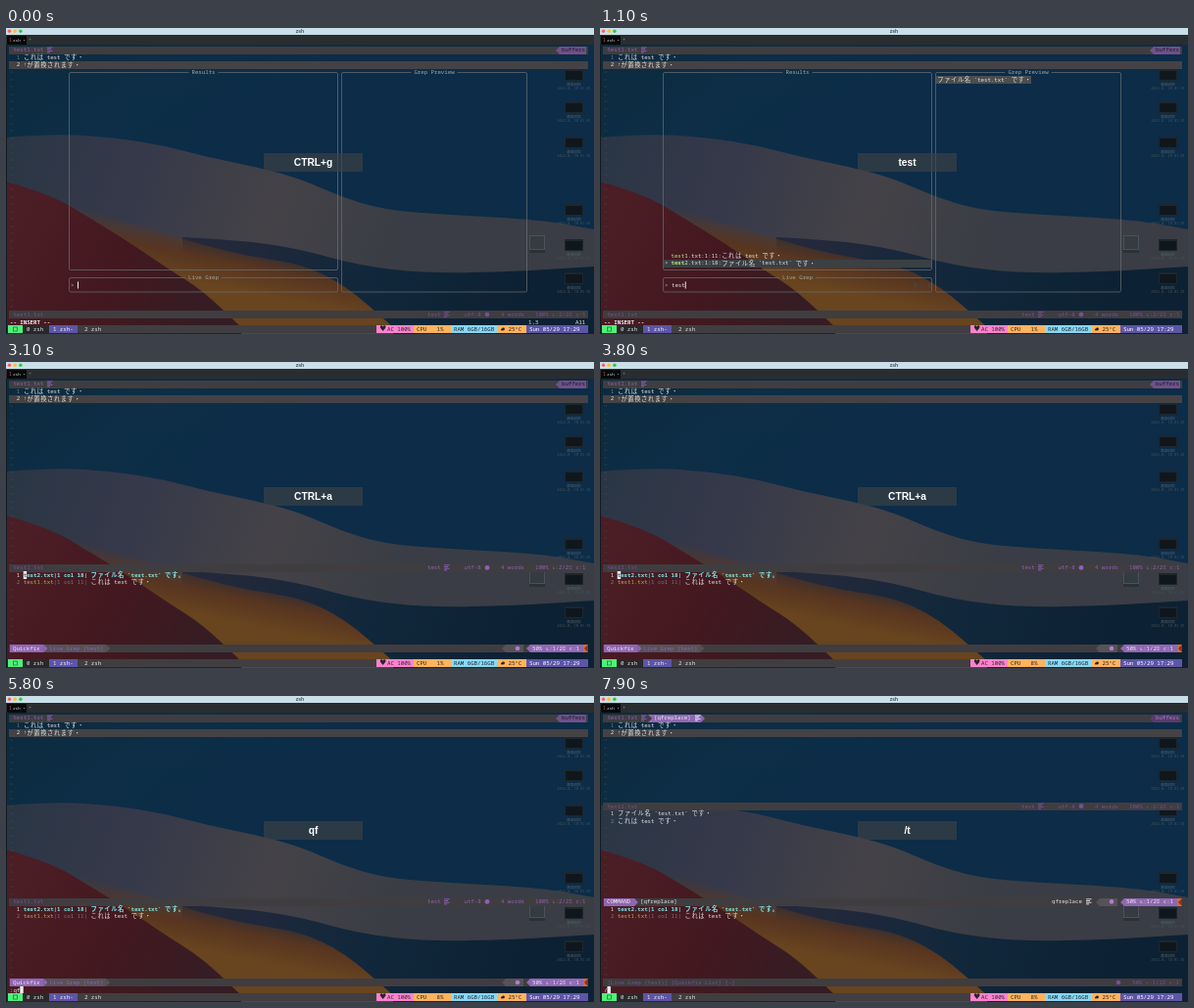
These frames come from a looping animation (600 by 313 pixels, 8 s). An HTML page with a canvas:

```html
<!DOCTYPE html>
<html lang="ja">
<meta charset="utf-8">
<title>Terminal session</title>
<style>
  html, body { margin: 0; width: 100%; height: 100%; overflow: hidden; background: #000 }
  canvas { display: block; width: 600px; height: 313px }
</style>
<canvas id="stage" width="600" height="313"></canvas>
<script>
const stage = document.getElementById('stage');
let ctx = stage.getContext('2d');
const W = 600, H = 313, LOOP = 8000;
const LEFT = 4, CELL = 3.43, TOP = 22.5, ROW = 7.515, LAST = 594;
const MONO = '"Noto Sans Mono", "Noto Sans CJK JP", "DejaVu Sans Mono", monospace';
const SANS = '"Liberation Sans", sans-serif';
const C = {
  text: '#e2e2e2', dim: '#77777c', faint: '#46525c', bar: '#3f3d40', cursorLine: '#444244',
  segment: '#565257', chip: '#8f67b2', purple: '#9060b5', darkPurple: '#774f96', cyan: '#79e4e6',
  yellow: '#b8ad4c', match: '#c5df7a', ink: '#25242c', border: '#697274'
};

const colX = col => LEFT + col * CELL;
const rowY = row => TOP + row * ROW;
const isWide = ch => ch.charCodeAt(0) > 0x2e80;

function box(x, y, w, h, color) {
  ctx.fillStyle = color;
  ctx.fillRect(x, y, w, h);
}

function fillRow(row, color, from = 3, to = LAST) {
  box(from, Math.round(rowY(row) - ROW / 2), to - from, 8, color);
}

function dot(x, y, r, color) {
  ctx.fillStyle = color;
  ctx.beginPath();
  ctx.arc(x, y, r, 0, 7);
  ctx.fill();
}

function label(str, x, y, font, color, align = 'center') {
  ctx.font = font;
  ctx.fillStyle = color;
  ctx.textAlign = align;
  ctx.fillText(str, x, y);
}

// Terminal text: one cell per character, two for wide ones. Returns the end x.
function put(str, x, row, color = C.text, bold = false) {
  ctx.textAlign = 'left';
  ctx.fillStyle = color;
  for (const ch of str) {
    const wide = isWide(ch);
    ctx.font = `${bold ? 'bold ' : ''}${wide ? 6.3 : 5.8}px ${MONO}`;
    ctx.fillText(ch, x + (wide ? .3 : 0), rowY(row) + .3);
    x += wide ? 2 * CELL : CELL;
  }
  return x;
}

function linesIcon(x, row, color) {
  [5.5, 4, 5.5, 3].forEach((w, i) => box(x, rowY(row) - 3 + i * 1.7, w, .9, color));
}

function arrow(x, row, color, dir = 1) {
  const y = Math.round(rowY(row) - ROW / 2);
  ctx.fillStyle = color;
  ctx.beginPath();
  ctx.moveTo(x, y);
  ctx.lineTo(x + 4 * dir, y + 4);
  ctx.lineTo(x, y + 8);
  ctx.fill();
}

// Fills the area below a smooth ridge through the points.
function ridge(points, paint) {
  ctx.beginPath();
  ctx.moveTo(points[0][0], H);
  ctx.lineTo(...points[0]);
  for (let i = 1; i < points.length - 1; i++) {
    const [x, y] = points[i], [nx, ny] = points[i + 1];
    ctx.quadraticCurveTo(x, y, (x + nx) / 2, (y + ny) / 2);
  }
  const end = points[points.length - 1];
  ctx.lineTo(...end);
  ctx.lineTo(end[0], H);
  ctx.fillStyle = paint;
  ctx.fill();
}

function gradient(x0, y0, x1, y1, ...colors) {
  const g = ctx.createLinearGradient(x0, y0, x1, y1);
  colors.forEach((c, i) => g.addColorStop(i / (colors.length - 1), c));
  return g;
}

function drawWallpaper() {
  box(0, 0, W, H, gradient(0, 17, 150, 200, '#0c2a3e', '#0d2e46', '#0c2c48'));
  ridge([[0, 112], [50, 108], [110, 112], [160, 120], [205, 132], [255, 142], [300, 154],
    [340, 172], [385, 186], [450, 191], [545, 196], [600, 206]],
    gradient(0, 110, 400, 230, '#2a3645', '#36394a', '#444247', '#3a3d45'));
  ridge([[180, 214], [240, 217], [300, 226], [360, 243], [430, 251], [520, 249], [600, 244]],
    gradient(220, 210, 520, 300, '#23293a', '#11273b', '#0c2133'));
  ridge([[50, 170], [100, 192], [150, 206], [200, 222], [250, 234], [300, 241], [345, 262], [395, 306]],
    gradient(110, 190, 100, 240, 'rgba(92, 56, 32, 0)', '#573520', '#68441f'));
  ridge([[0, 157], [45, 170], [85, 194], [130, 222], [165, 246], [200, 268], [240, 306]],
    gradient(20, 190, 200, 290, '#4b1d25', '#44181f', '#361c24'));

  for (const y of [42, 75, 111, 180, 216, 250]) {
    box(570, y, 19, 12, '#1d272e');
    box(571, y + 2, 17, 9, '#10171c');
    label('画面収録', 579.5, y + 15.5, `3.6px ${MONO}`, '#56626c');
    label('2022-0… 10.01.01', 579.5, y + 20, `3.6px ${MONO}`, '#44525d');
  }
  box(534, 212, 16, 18, '#4a5157');
  box(535, 213, 14, 13, '#343c42');
  box(534, 227, 16, 3, '#2a3137');

  box(0, 0, W, 7, '#c9dfe9');
  ['#ff5f57', '#febc2e', '#28c840'].forEach((c, i) => dot(3.5 + i * 5.7, 3.2, 1.7, c));
  label('zsh', 300, 3.4, `bold 5px ${SANS}`, '#455058');
  box(0, 7, W, 10, '#292d30');
  box(1, 8, 20, 9, '#08090a');
  label('1', 3, 12.3, `4.5px ${MONO}`, '#d66558', 'left');
  label('zsh •', 7, 12.3, `4.3px ${MONO}`, '#d7d7d7', 'left');
  label('+', 24.5, 12.3, `5px ${MONO}`, '#8a8a8a');
  box(0, 17, 1, H - 17, '#111b22');
}

function tildes(from, to) {
  for (let row = from; row <= to; row++) put('~', LEFT, row, C.faint);
}

function numbered(row, n, str, active) {
  put(String(n), colX(2), row, active ? C.text : C.dim);
  put(str, colX(4), row);
}

function drawTabline(replacing) {
  const buffersColor = replacing ? '#573c6b' : '#70508a';
  fillRow(0, C.bar);
  put('test1.txt', colX(1), 0, C.purple);
  linesIcon(42, 0, C.purple);
  if (replacing) {
    fillRow(0, C.chip, 49, 103);
    arrow(49, 0, C.bar);
    arrow(103, 0, C.chip);
    put('[qfreplace]', 55, 0, '#efe6f5');
    linesIcon(97, 0, '#efe6f5');
  }
  fillRow(0, buffersColor, 565, 592);
  arrow(565, 0, buffersColor, -1);
  put('buffers', 567, 0, replacing ? '#a77ac5' : '#1d1b22');
}

function inactiveStatus(row, color) {
  fillRow(row, C.bar);
  put('test1.txt', colX(1), row, C.darkPurple);
  put('test', 430, row, color);
  linesIcon(447, row, color);
  put('utf-8', 467.5, row, color);
  dot(491, rowY(row), 2.4, color);
  put('4 words', 505, row, color);
  put('100% ʟ:2/2≡ ᴄ:1', 540, row, color);
}

function activeStatus(row, mode, title, titleColor, fileType) {
  const modeEnd = 11 + mode.length * CELL;
  const titleX = modeEnd + 6, titleEnd = titleX + title.length * CELL + 3;
  fillRow(row, C.bar);
  if (fileType) {
    put(fileType, 461, row);
    linesIcon(496, row, C.text);
  } else {
    fillRow(row, C.segment, modeEnd, titleEnd);
    arrow(titleEnd, row, C.segment);
  }
  fillRow(row, C.chip, 4, modeEnd);
  arrow(modeEnd, row, C.chip);
  put(mode, 7, row, '#f0e8f4');
  put(title, titleX, row, titleColor);
  fillRow(row, C.segment, 510, 528);
  arrow(510, row, C.segment, -1);
  dot(522, rowY(row), 2.3, '#b27bd0');
  fillRow(row, C.chip, 535, 589);
  arrow(535, row, C.chip, -1);
  put('50% ʟ:1/2≡ ᴄ:1', 537, row, '#f0e8f4');
  fillRow(row, '#d36b2d', 589, LAST);
  arrow(594, row, '#8f2f24', -1);
}

function drawQuickfix(focused) {
  put('1', colX(2), 26);
  put('2', colX(2), 27, C.dim);
  put('test2.txt|1 col 18| ファイル名 `test.txt` です。', colX(4), 26, C.cyan, true);
  let x = put('test1.txt', colX(4), 27, C.yellow);
  x = put('|1 col 11|', x, 27, C.dim);
  put(' これは test です・', x, 27);
  if (focused) cursor(4, 26, 't');
  tildes(28, 35);
}

function cursor(col, row, under) {
  fillRow(row, '#eeeeee', colX(col), colX(col + (isWide(under) ? 2 : 1)));
  put(under, colX(col), row, '#222');
}

function frame(x, y, right, bottom, title) {
  ctx.strokeStyle = C.border;
  ctx.lineWidth = .7;
  ctx.beginPath();
  ctx.roundRect(x, y, right - x, bottom - y, 1.5);
  ctx.stroke();
  const mid = (x + right) / 2, half = title.length * CELL / 2;
  ctx.save();
  ctx.beginPath();
  ctx.rect(mid - half - 3, y - 1, half * 2 + 6, 2);
  ctx.clip();
  ctx.drawImage(wallpaper, 0, 0);
  ctx.restore();
  put(title, mid - half, (y - TOP) / ROW, '#a2a6a7');
}

function drawPicker(query) {
  frame(64.5, 45.5, 338.5, 247.5, 'Results');
  frame(64.5, 255.5, 338.5, 270, 'Live Grep');
  frame(342.5, 45.5, 531.5, 270, 'Grep Preview');
  put('>', 66, 32, '#a7bdc7');
  const caret = put(query, 73, 32);
  box(caret, rowY(32) - 3.5, 1, 7, '#eee');
  if (!query) return;

  fillRow(29, '#3b4044', 65, 338);
  put('>', 66, 29);
  [['1.txt:1:11:これは test です・', 28], ['2.txt:1:18:ファイル名 `test.txt` です・', 29]]
    .forEach(([rest, row]) => put(rest, put('test', 72.5, row, C.match, row === 29), row));
  put('2 / 2', 320, 32, C.faint);
  fillRow(4, '#4b4d4f', 343, 440);
  put('ファイル名 `test.txt` です・', 344, 4);
}

function drawTmux(cpu) {
  fillRow(38, '#403e41', 2);
  fillRow(38, '#50f07a', 2, 17);
  ctx.strokeStyle = '#237a3c';
  ctx.lineWidth = .8;
  ctx.strokeRect(7.5, 306, 4, 4);
  fillRow(38, '#2a282c', 17, 44);
  put('0 zsh', 21, 38);
  fillRow(38, '#5d55a6', 44, 73);
  put('1 zsh-', 48, 38, '#f2f2f2');
  put('2 zsh', 80, 38);
  const segments = [
    [378, 416, '#ff82cd', 'AC 100%', 389], [416, 454, '#ffb35c', `CPU   ${cpu}%`, 419],
    [454, 502, '#86d9f4', 'RAM 6GB/16GB', 457], [502, 531, '#ffb35c', '25°C', 512.5]
  ];
  for (const [from, to, color, str, x] of segments) {
    fillRow(38, color, from, to);
    put(str, x, 38, C.ink);
  }
  fillRow(38, '#5d55a6', 531);
  put('Sun 05/29 17:29', 534, 38, '#fff');
  label('♥', 384.5, 308.2, '8px "DejaVu Sans", sans-serif', C.ink);
  dot(506, 308.5, 1.1, C.ink);
  dot(507.5, 308, 1.4, C.ink);
}

// Latest entry whose start time has passed.
const at = (track, t) => track.filter(([start]) => start <= t).pop()[1];

const keys = [[0, 'CTRL+g'], [500, 't'], [600, 'te'], [700, 'tes'], [800, 'test'], [1800, ''],
  [2700, 'CTRL+a'], [3900, ''], [5200, ':'], [5500, 'q'], [5700, 'qf'], [6900, ''], [7500, '/'], [7800, '/t']];
const queries = [[0, ''], [500, 't'], [600, 'te'], [700, 'tes'], [800, 'test']];
const commands = [[0, ''], [5200, ':'], [5500, ':q'], [5700, ':qf'], [5900, ':Qfreplace'], [7500, '/']];
const scenes = [[0, 'picker'], [2700, 'quickfix'], [6100, 'replace']];

const wallpaper = document.createElement('canvas');
wallpaper.width = W;
wallpaper.height = H;
const screen = ctx;
ctx = wallpaper.getContext('2d');
ctx.textBaseline = 'middle';
drawWallpaper();
ctx = screen;
ctx.textBaseline = 'middle';

function draw(t) {
  const scene = at(scenes, t), command = at(commands, t);
  const replacing = scene === 'replace';
  const searching = command === '/';
  ctx.drawImage(wallpaper, 0, 0);
  drawTabline(replacing);
  fillRow(2, C.cursorLine);
  numbered(1, 1, 'これは test です・', false);
  numbered(2, 2, '↑が置換されます・', true);

  if (scene === 'picker') {
    tildes(3, 35);
    inactiveStatus(36, C.darkPurple);
    drawPicker(at(queries, t));
    put('-- INSERT --', LEFT, 37, '#eee', true);
    if (t < 200) {
      put('1,3', 533, 37);
      put('All', 581, 37);
    }
  } else if (scene === 'quickfix') {
    tildes(3, 24);
    inactiveStatus(25, C.purple);
    drawQuickfix(!command);
    activeStatus(36, 'Quickfix', 'Live Grep (test)', C.purple);
  } else {
    tildes(3, 11);
    inactiveStatus(12, C.darkPurple);
    numbered(13, 1, 'ファイル名 `test.txt` です・', true);
    numbered(14, 2, 'これは test です・', false);
    if (!searching) cursor(4, 13, 'フ');
    tildes(15, 24);
    activeStatus(25, searching ? 'COMMAND' : 'NORMAL', '[qfreplace]', C.text, 'qfreplace');
    drawQuickfix(false);
    fillRow(36, C.bar);
    put('[Live Grep (test)] [Quickfix List] [-]', colX(1), 36, C.darkPurple);
    dot(529, rowY(36), 2.3, C.darkPurple);
    put('50% ʟ:1/2≡ ᴄ:1', 543, 36, C.darkPurple);
  }

  const end = put(command, LEFT, 37);
  if (command && (searching || !replacing)) fillRow(37, '#eeeeee', end, end + CELL);
  drawTmux(t < 3800 ? 1 : 8);

  box(263, 128, 101, 19, 'rgba(62, 66, 70, .65)');
  label(at(keys, t), 313.5, 138, `bold 10.2px ${SANS}`, '#fff');
}

function tick() {
  draw(performance.now() % LOOP);
  requestAnimationFrame(tick);
}
tick();
</script>
</html>
```
